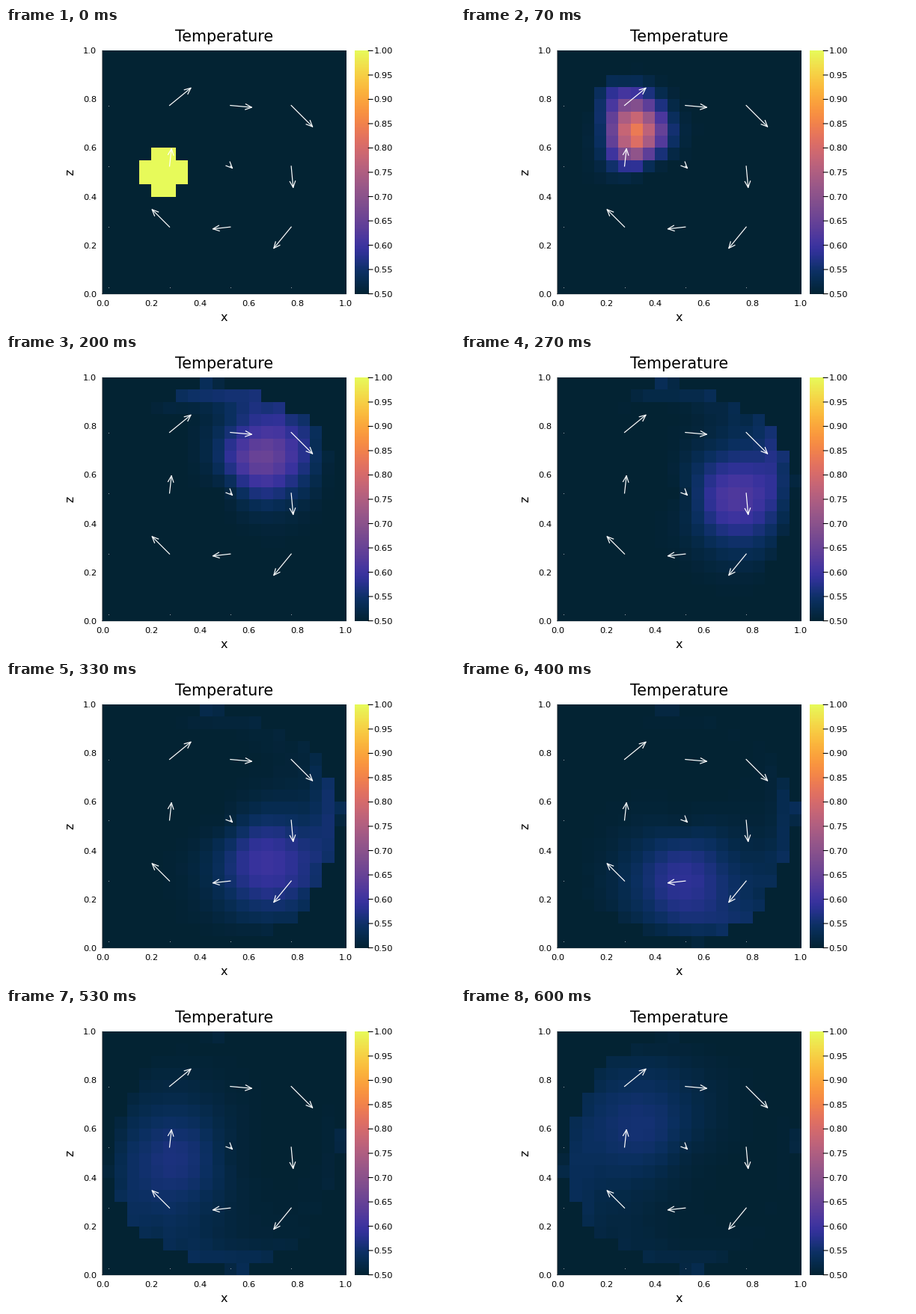
Write a matplotlib script that moves like this. It is 600 by 400 pixels and loops after 670 ms.

```python
import numpy as np
import matplotlib.pyplot as plt
from matplotlib.animation import FuncAnimation
from matplotlib.colors import ListedColormap

W, H, DPI = 600, 400, 100
LEFT, TOP, SIDE = 129.1, 30.4, 325.2
N = 20                    # cells per side
STATES, STEPS = 10, 10    # pictures per loop, solver steps between them
TICKS = 67                # 10 ms ticks per loop
TURN = np.pi / 4 / STEPS  # rotation per solver step
PX = 72 / DPI             # points per pixel

plt.rcParams["font.family"] = "DejaVu Sans"


def thermal():
    stops = np.array([
        (3, 35, 51), (13, 48, 100), (53, 50, 155), (93, 62, 153),
        (126, 77, 143), (158, 89, 135), (193, 100, 121), (225, 113, 97),
        (246, 139, 69), (251, 173, 60), (246, 211, 70), (231, 250, 90)]) / 255
    slope = np.gradient(stops, axis=0)
    s = np.linspace(0, len(stops) - 1, 256)
    i = np.minimum(s.astype(int), len(stops) - 2)
    f = (s - i)[:, None]
    rgb = ((1 + 2 * f) * (1 - f) ** 2 * stops[i] + f * (1 - f) ** 2 * slope[i]
           + f * f * (3 - 2 * f) * stops[i + 1] + f * f * (f - 1) * slope[i + 1])
    return ListedColormap(np.clip(rgb, 0, 1))


# Solid-body rotation in cell centres, at rest outside a circle,
# averaged onto the cell faces
mid = (np.arange(N) + 0.5) / N - 0.5
inside = np.hypot(mid, mid[:, None]) < 0.435
u = np.pad(np.where(inside, mid[:, None], 0), ((0, 0), (1, 1))) * TURN * N
w = np.pad(np.where(inside, -mid, 0), ((1, 1), (0, 0))) * TURN * N
u = (u[:, :-1] + u[:, 1:]) / 2
w = (w[:-1] + w[1:]) / 2


def advect(t):
    """One first-order upwind step."""
    gx = np.diff(np.pad(t, ((0, 0), (1, 1)), "edge"), axis=1)
    gz = np.diff(np.pad(t, ((1, 1), (0, 0)), "edge"), axis=0)
    fx = np.maximum(u[:, :-1], 0) * gx[:, :-1] + np.minimum(u[:, 1:], 0) * gx[:, 1:]
    fz = np.maximum(w[:-1], 0) * gz[:-1] + np.minimum(w[1:], 0) * gz[1:]
    return t - fx - fz


def simulate():
    t = np.where(np.hypot(mid + 0.25, mid[:, None]) < 0.1, 1.0, 0.5)
    states = [t]
    for _ in range(STATES - 1):
        for _ in range(STEPS):
            t = advect(t)
        states.append(t)
    return states


fig = plt.figure(figsize=(W / DPI, H / DPI), dpi=DPI, facecolor="white")


def add_axes(x, width):
    ax = fig.add_axes([x / W, 1 - (TOP + SIDE) / H, width / W, SIDE / H])
    ax.set(xticks=[], yticks=[])
    for spine in ax.spines.values():
        spine.set_visible(False)
    return ax


def label(x, y, text, size, ha="center", va="center_baseline", **kw):
    fig.text(x / W, 1 - y / H, text, size=size * PX, ha=ha, va=va, **kw)


def line(xs, ys, color="black", width=1.1, **kw):
    fig.add_artist(plt.Line2D(np.array(xs) / W, 1 - np.array(ys) / H,
                              color=color, lw=width * PX, snap=False, **kw))


def arrow(x, z):
    px, py = LEFT + x * SIDE, TOP + (1 - z) * SIDE
    dx, dy = 0.318 * SIDE * (z - 0.5), 0.318 * SIDE * (x - 0.5)
    tx, ty = px + dx, py + dy
    line([px, tx], [py, ty], "white", 1.2)
    back = np.arctan2(dy, dx) + np.pi
    a, b = back + np.radians(24), back - np.radians(24)
    line([tx + 9 * np.cos(a), tx, tx + 9 * np.cos(b)],
         [ty + 9 * np.sin(a), ty, ty + 9 * np.sin(b)], "white", 1.2)


cmap = thermal()
states = simulate()
style = dict(cmap=cmap, origin="lower", aspect="auto", interpolation="nearest")

ax = add_axes(LEFT, SIDE)
heat = ax.imshow(states[0], vmin=0.5, vmax=1, extent=(0, 1, 0, 1), **style)
bar = add_axes(466, 18.2)
bar.imshow(np.arange(256)[:, None], **style)

# Sampled velocity vectors, a faint dot where the fluid is at rest
nodes = 0.025 + 0.25 * np.arange(4)
for x in nodes:
    for z in nodes:
        if np.hypot(x - 0.5, z - 0.5) < 0.435:
            arrow(x, z)
        else:
            ax.plot(x, z, "s", ms=1 * PX, mew=0, color="white", alpha=0.6)

# Axis lines lie under the heat map
bottom = TOP + SIDE
line([LEFT, LEFT], [TOP, bottom], zorder=-1)
line([LEFT, LEFT + SIDE], [bottom, bottom], zorder=-1)
line([484.3, 484.3], [TOP, bottom], zorder=-1)

for v in np.linspace(0, 1, 6):
    label(LEFT + v * SIDE, 371.5, f"{v:.1f}", 11.5, va="baseline")
    label(121.2, bottom - v * SIDE, f"{v:.1f}", 11.5, ha="right")
for v in np.linspace(0.5, 1, 11):
    y = bottom - (v - 0.5) * 2 * SIDE
    line([484.3, 490], [y, y])
    label(491.6, y, f"{v:.2f}", 11.5, ha="left")

label(292, 18.3, "Temperature", 20.6, va="baseline")
label(291.5, 391.5, "x", 16, va="baseline")
label(86, 192.7, "z", 16, va="center", rotation=90)


def draw(tick):
    # pictures change on the nearest tick to an even spacing of 20/3
    heat.set_data(states[(3 * tick + 1) // 20])
    return heat,


anim = FuncAnimation(fig, draw, frames=TICKS, interval=10, repeat=True)
plt.show()
```
